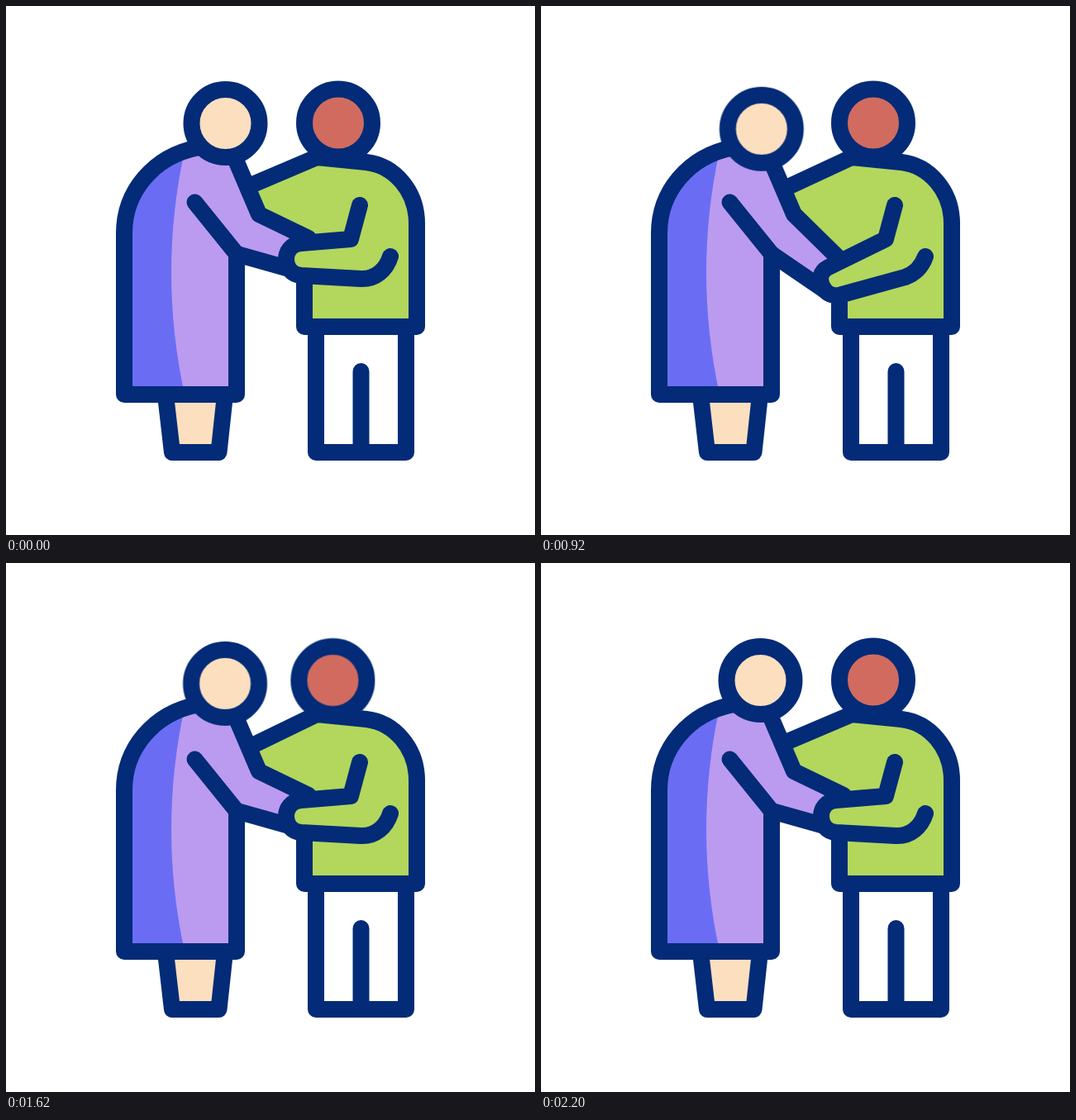
Recreate the animation shown at these times as an HTML page. Size 640x640 px, loop 2400 ms.

```html
<!DOCTYPE html>
<html lang="en">
<head>
<meta charset="utf-8">
<title>Two people holding arms</title>
<style>
  html, body { margin: 0; width: 100%; height: 100%; overflow: hidden; background: #fff; }
  svg { display: block; width: 100vw; height: 100vh; }

  path, circle {
    fill: none;
    stroke: #032b77;
    stroke-width: 20;
    stroke-linecap: round;
    stroke-linejoin: round;
    animation: 2400ms linear infinite;
  }
  .skin { fill: #fcdfbf; }
  .brown { fill: #d16b60; }
  .green { fill: #b2d75c; }
  .lilac { fill: #bb9bf0; stroke: none; }
  .shade { fill: #6a6df4; stroke: none; }

  .head-a { animation-name: nod; }
  .head-b { animation-name: lean; }
  .coat { animation-name: sleeve; }
  .shirt { animation-name: shoulder; }
  .forearm { animation-name: forearm; }

  @keyframes nod {
    0%, 8.333%, 91.667%, 100% { transform: translate(0, 0); }
    30.833% { transform: translate(5.5px, 11.5px); }
    50% { transform: translate(-5px, -.5px); }
    56.25% { transform: translate(-8px, -2px); }
    75% { transform: translate(4.5px, 7.8px); }
  }

  @keyframes lean {
    0%, 56.25%, 91.667%, 100% { transform: translate(0, 0); }
    75% { transform: translate(-11px, .8px); }
  }

  @keyframes sleeve {
    0%, 8.333%, 59.583%, 100% {
      d: path("M279 470H143V275C143 224 179 182 231 171.5L268 163L306 252L366 281L350 320L279 300Z");
    }
    30.833%, 45% {
      d: path("M279 470H143V275C143 224 179 182 231 171.5L268 163L306 252L360 305L350 348.5L279 300Z");
    }
  }

  @keyframes forearm {
    0%, 8.333%, 59.583%, 100% {
      d: path("M428 241L417 282L357 287C333 289 333 324 357 326L429 330C447 331 460 319 465 303");
    }
    30.833%, 45% {
      d: path("M428 241L417 282L347.2 316.4C328 326 342.8 355.5 362.5 349.5L440 328.2C453 323.6 461.2 314 465 303");
    }
  }

  @keyframes shoulder {
    0%, 30.833%, 91.667%, 100% {
      d: path("M361 330V388H497V263C497 224 470 193 436 189L376 183L289 220L304 254L345 293");
    }
    50% {
      d: path("M361 330V388H497V263C497 224 470 193 436 189L376 183L289 229L304 254L345 293");
    }
  }
</style>
</head>
<body>
<svg viewBox="0 0 640 640">
  <!-- legs -->
  <path class="skin" d="M193.5 475L201 540H257.5L264.5 475"/>
  <path d="M375 390V540H484V390M429.5 442V540"/>

  <!-- right figure -->
  <path class="green shirt" d="M361 330V388H497V263C497 224 470 193 436 189L376 183L289 220L304 254L345 293"/>
  <circle class="brown head-b" cx="402" cy="141.5" r="41"/>

  <!-- left figure -->
  <path class="lilac coat" d="M279 470H143V275C143 224 179 182 231 171.5L268 163L306 252L366 281L350 320L279 300Z"/>
  <path class="shade" d="M143 470V275C143 224 179 182 216 175Q184 322 216 470Z"/>
  <path class="coat" d="M279 470H143V275C143 224 179 182 231 171.5L268 163L306 252L366 281L350 320L279 300Z"/>
  <path d="M228.5 237.5L279 300"/>
  <circle class="skin head-a" cx="265.5" cy="142" r="41"/>

  <!-- forearm in front of the sleeve -->
  <path class="green forearm" d="M428 241L417 282L357 287C333 289 333 324 357 326L429 330C447 331 460 319 465 303"/>
</svg>
</body>
</html>
```
